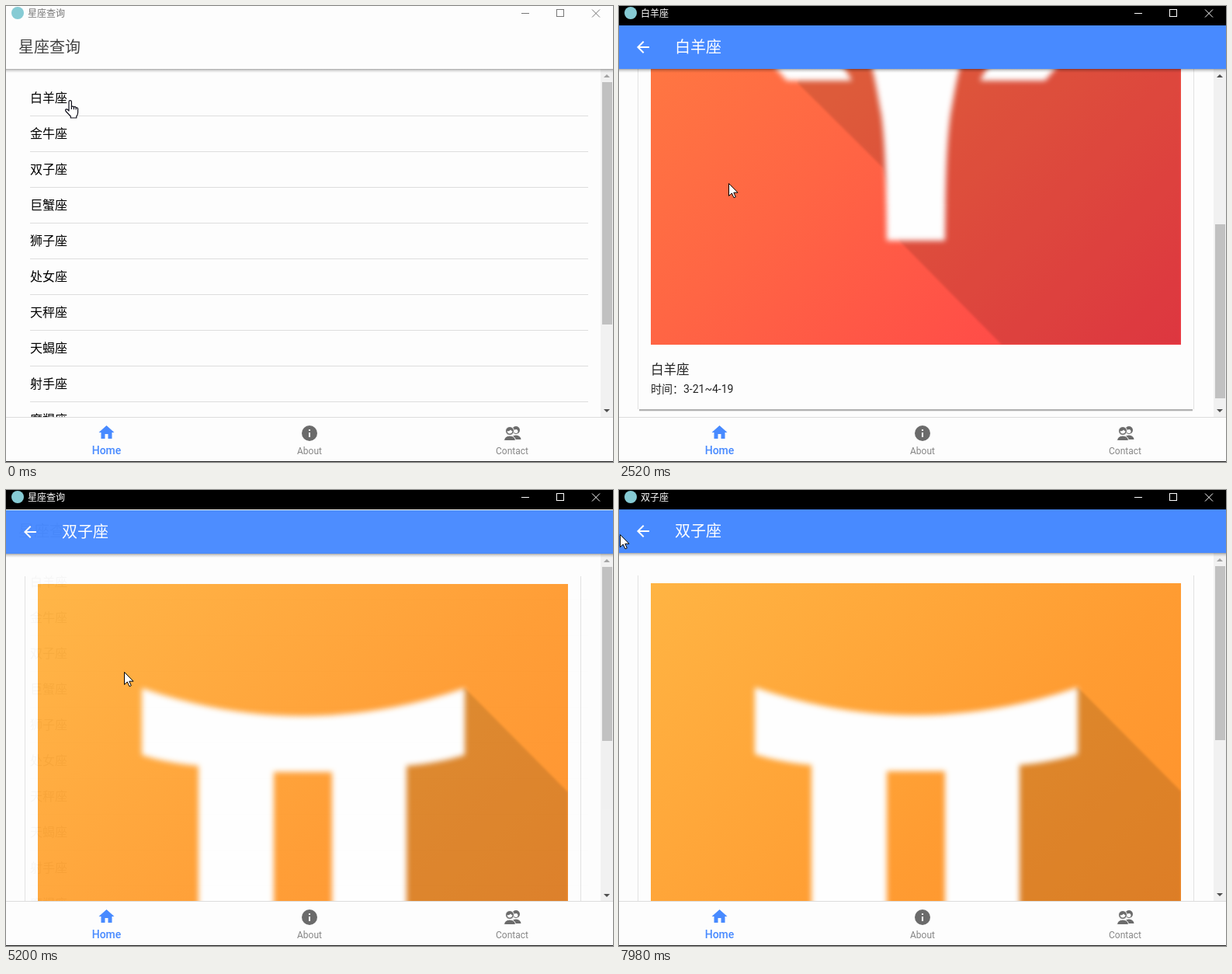
Animation of 782 by 587 pixels, one loop 8 s. Source, as an HTML page:

```html
<!DOCTYPE html>
<html lang="zh-CN">
<head>
<meta charset="utf-8">
<title>星座查询</title>
<style>
  html, body { margin: 0; width: 100%; height: 100%; overflow: hidden; background: #fdfdfd; }
  svg { display: block; }
  text { font-family: Roboto, "Noto Sans CJK SC", sans-serif; font-size: 16px; }
  .crisp { shape-rendering: crispEdges; }
  .bar-title { font-size: 20px; font-weight: 300; }
  .tab { font-size: 12px; text-anchor: middle; fill: #868686; }
  .tab.on { font-size: 14px; font-weight: 500; fill: #488aff; }
</style>
</head>
<body>
<svg id="stage" width="782" height="587" viewBox="0 0 782 587"></svg>
<script>
const LOOP = 8000;
const APP = '星座查询';
const SIGNS = ['白羊座', '金牛座', '双子座', '巨蟹座', '狮子座', '处女座', '天秤座', '天蝎座', '射手座', '摩羯座'];

const rect = (x, y, w, h, fill, extra = '') =>
  `<rect class="crisp" x="${x}" y="${y}" width="${w}" height="${h}" fill="${fill}" ${extra}/>`;
const text = (x, y, str, attrs = '') => `<text x="${x}" y="${y}" ${attrs}>${str}</text>`;

const horn = 'M383.5 376L382 374C357 304 308 252 250 252C195 252 161 290 161 342C161 387 184 427 216 463' +
  'H300C284 432 248 396 248 370C250 354 274 352 290 370C324 410 330 465 338 507C343 545 344 580 345 669H383.5Z';
const details = [
  {
    name: '白羊座', dates: '3-21~4-19', colors: ['#ff8640', '#ff6544', '#ff3f4a'],
    shadow: 'M230 466L340 575L362 670L493 803H724V411L604 312L510 360L382 410L265 358Z',
    glyph: `<path d="${horn}"/><path d="${horn}" transform="translate(765) scale(-1 1)"/>`
  },
  {
    name: '双子座', dates: '5-21~6-21', colors: ['#ffb443', '#ff9c32', '#ff8a28'],
    shadow: 'M591 254L724 388V803H296L175 682L382 640H500V345Z',
    glyph: '<path fill-rule="evenodd" d="M175 254Q382 326 591 254V340Q560 350 516 354V582Q560 586 591 596V682' +
      'Q382 612 175 682V596Q205 586 248 582V354Q205 350 175 340ZM345 362H420V573H345Z"/>'
  }
];

const scrollbar = (height, id) => `
  ${rect(766, 81, 16, 449, '#f1f1f1')}
  <path id="up${id}" d="M770 92h8l-4-4z" fill="#a3a3a3"/>
  <path d="M770 519h8l-4 4z" fill="#505050"/>
  <rect id="thumb${id}" x="768" y="98" width="13" height="${height}" fill="#c1c1c1"/>`;

const header = (fill, content) => `
  ${rect(0, 81, 782, 5, 'url(#drop)')}${rect(0, 25, 782, 56, fill)}${content}`;

const listView = () => `
  ${rect(0, 25, 782, 505, '#fdfdfd')}
  <rect id="press" x="15" width="735" height="45" fill="#f0f0f0"/>
  ${SIGNS.map((s, i) => text(31, 124 + 46 * i, s) + rect(31, 141 + 46 * i, 719, 1, '#dedede')).join('')}
  ${scrollbar(312, 'List')}
  ${header('#fdfdfd', text(16, 60, APP, 'class="bar-title" fill="#424242"'))}`;

const detailView = (d, i) => `
  <g id="page${i}">
    <linearGradient id="sky${i}" x2="1" y2="1">
      ${d.colors.map((c, k) => `<stop offset="${k / 2}" stop-color="${c}"/>`).join('')}
    </linearGradient>
    ${rect(0, 25, 782, 505, '#fdfdfd')}
    <g id="scroll${i}">
      ${rect(26, 886, 713, 2, '#000', 'opacity=".3"')}
      ${rect(26, 888, 713, 1, '#000', 'opacity=".08"')}
      ${rect(24, 110, 717, 776, '#e2e2e2')}${rect(25, 110, 715, 776, '#fdfdfd')}
      <g clip-path="url(#photo)">
        ${rect(41, 120, 683, 683, `url(#sky${i})`)}
        <path d="${d.shadow}" opacity=".13" filter="url(#soft)"/>
        <g fill="#fefefe" filter="url(#blur)">${d.glyph}</g>
      </g>
      ${text(41, 841, d.name, 'font-weight="500" fill="#222" style="font-size:16.5px"')}
      ${text(41, 865, '时间：' + d.dates, 'fill="#222" style="font-size:14px"')}
    </g>
    ${scrollbar(224, i)}
    ${header('#488aff', text(72, 60, d.name, 'class="bar-title" fill="#fff"'))}
    <path id="back${i}" transform="translate(19 41)" d="M20 11H7.83l5.59-5.59L12 4l-8 8 8 8 1.41-1.41L7.83 13H20z"/>
  </g>`;

const tabs = `
  ${rect(0, 529, 782, 1, '#dcdcdc')}${rect(0, 530, 782, 56, '#fdfdfd')}${rect(0, 586, 782, 1, '#1c1c1c')}
  <path transform="translate(117.5 537)" d="M10 20v-6h4v6h5v-8h3L12 3 2 12h3v8z" fill="#488aff"/>
  <circle cx="391" cy="550" r="10" fill="#6b6b6b"/>
  ${rect(390, 545, 2, 2, '#fff')}${rect(390, 549, 2, 6, '#fff')}
  <g fill="#6b6b6b">
    <circle cx="657" cy="546" r="5"/><path d="M650 558q1-5 7-5.500q6 .5 6.500 5.500z"/>
    <circle cx="657" cy="547.500" r="2.500" fill="#fdfdfd"/>
    <g stroke="#fdfdfd"><circle cx="649" cy="547" r="5.500"/><path d="M641.500 559.500q.5-6 7.500-6.500q7 .5 7.500 6.500z"/></g>
    <path d="M645.500 547q3 1 4.500-1.500q1 1.500 2.500 1.500q-.5 3.500-3.500 3.500t-3.500-3.500z" fill="#fdfdfd"/>
  </g>
  ${text(129.5, 577, 'Home', 'class="tab on"')}
  ${text(391, 577, 'About', 'class="tab"')}
  ${text(652, 577, 'Contact', 'class="tab"')}`;

const windowBar = `
  <rect id="bar" class="crisp" width="782" height="25"/>
  <circle cx="15" cy="9" r="8" fill="#86cbd4"/>
  <text id="title" x="28" y="14" style="font-size:12px"></text>
  <path id="buttons" class="crisp" d="M664 9.500h10M709.500 4.500h9v9h-9z" fill="none"/>
  <path id="close" d="M755 4.500l10 10M765 4.500l-10 10" fill="none"/>`;

const cursors = `
  <path id="arrow" d="M.5.5V16.500L4.300 13L7 18.800L9.300 17.800L6.800 12.200H12Z" fill="#fff" stroke="#000"/>
  <g id="hand" fill="#fff" stroke="#10101c" stroke-width="1.200" stroke-linejoin="round">
    <path d="M5 14V2.300a1.700 1.700 0 0 1 3.400 0V8.500q1.800-1 3 .6q1.700-1 2.800.8q2.200-.5 2.400 1.500V16q0 3-1.800 5V23H7.300V21L1.100 14.500q-1.200-2 .5-2.600q1.600-.4 3.400 2.100Z"/>
    <path d="M8.400 8.500V12M11.400 9.100V12.300M14.200 9.900V12.600" fill="none"/>
  </g>`;

document.getElementById('stage').innerHTML = `
  <defs>
    <linearGradient id="drop" x2="0" y2="1">
      <stop stop-opacity=".34"/><stop offset=".4" stop-opacity=".14"/><stop offset="1" stop-opacity="0"/>
    </linearGradient>
    <filter id="blur" x="-10%" y="-10%" width="120%" height="120%" color-interpolation-filters="sRGB"><feGaussianBlur stdDeviation="3.800"/></filter>
    <filter id="soft"><feGaussianBlur stdDeviation="1.500"/></filter>
    <clipPath id="photo"><rect x="41" y="120" width="683" height="683"/></clipPath>
  </defs>
  ${listView()}${details.map(detailView).join('')}${tabs}${windowBar}${cursors}`;

// time, cursor, x, y, page (-1 is the list), scroll, page lift, pressed row
const steps = [
  [0, 'hand', 76, 121, -1],
  [530, 'hand', 74, 121, -1],
  [940, 'hand', 74, 121, -1, 0, 0, 0],
  [1090, 'hand', 74, 121, 0, 0, 12, 0],
  [1240, 'arrow', 80, 121, 0, 0, 1],
  [1390, 'arrow', 78, 118, 0],
  [1540, 'arrow', 60, 95, 0],
  [1690, 'hand', 39, 72, 0],
  [1840, 'arrow', 100, 150, 0],
  [1960, 'arrow', 141, 228, 0],
  [2080, 'arrow', 141, 228, 0, 60],
  [2220, 'arrow', 141, 228, 0, 160],
  [2370, 'arrow', 141, 228, 0, 270],
  [2520, 'arrow', 141, 228, 0, 367],
  [2670, 'arrow', 141, 228, 0, 380],
  [3080, 'arrow', 110, 170, 0, 380],
  [3230, 'arrow', 60, 100, 0, 380],
  [3380, 'hand', 22, 52, 0, 380],
  [3520, 'hand', 15, 45, 0, 380],
  [3800, 'hand', 15, 45, 0, 380, 14],
  [3960, 'hand', 70, 150, -1],
  [4110, 'hand', 134, 272, -1],
  [4260, 'hand', 140, 262, -1],
  [4400, 'hand', 144, 250, -1],
  [4520, 'hand', 146, 242, -1],
  [4660, 'hand', 146, 236, -1],
  [4800, 'hand', 146, 230, -1],
  [4920, 'hand', 146, 230, -1, 0, 0, 2],
  [5060, 'hand', 146, 230, 1, 0, 12, 2],
  [5200, 'arrow', 152, 234, 1, 0, 1, 2],
  [5350, 'arrow', 152, 234, 1],
  [5490, 'arrow', 240, 280, 1],
  [5620, 'arrow', 329, 323, 1, 100],
  [5760, 'arrow', 329, 323, 1, 200],
  [5890, 'arrow', 329, 323, 1, 300],
  [6350, 'arrow', 329, 323, 1, 379],
  [6500, 'arrow', 329, 323, 1, 380],
  [7030, 'arrow', 329, 323, 1, 320],
  [7160, 'arrow', 329, 323, 1, 230],
  [7280, 'arrow', 329, 323, 1, 180],
  [7550, 'arrow', 329, 323, 1, 110],
  [7700, 'arrow', 329, 323, 1, 30],
  [7840, 'arrow', 130, 170, 1],
  [7980, 'arrow', 1, 57, 1]
];

const el = id => document.getElementById(id);
const set = (id, attrs) => Object.entries(attrs).forEach(([k, v]) => el(id).setAttribute(k, v));
const show = (id, on) => set(id, { display: on ? 'inline' : 'none' });

function draw([time, cursor, x, y, page, scroll = 0, lift = 0, row = -1]) {
  const focused = time >= 940;
  const ink = focused ? '#fff' : '#777';
  set('bar', { fill: focused ? '#000' : '#fdfdfd' });
  set('title', { fill: ink });
  set('buttons', { stroke: ink });
  set('close', { stroke: ink });
  el('title').textContent = page < 0 || lift ? APP : details[page].name;

  show('press', row >= 0);
  set('press', { y: 96 + 46 * row });
  details.forEach((_, i) => show('page' + i, i === page));
  if (page >= 0) {
    set('page' + page, { transform: `translate(0 ${lift})`, opacity: 1 - lift / 40 });
    set('scroll' + page, { transform: `translate(0 ${-scroll})` });
    set('thumb' + page, { y: Math.round(98 + scroll * 0.4987) });
    set('up' + page, { fill: scroll ? '#505050' : '#a3a3a3' });
    set('back' + page, { fill: cursor === 'hand' && y < 81 ? '#3c3c3c' : '#fff' });
  }
  for (const name of ['arrow', 'hand']) show(name, name === cursor);
  set(cursor, { transform: `translate(${x} ${y})` });
}

let current;
function tick() {
  const t = performance.now() % LOOP;
  const step = steps.findLast(s => s[0] <= t);
  if (step !== current) draw(current = step);
  requestAnimationFrame(tick);
}
tick();
</script>
</body>
</html>
```
